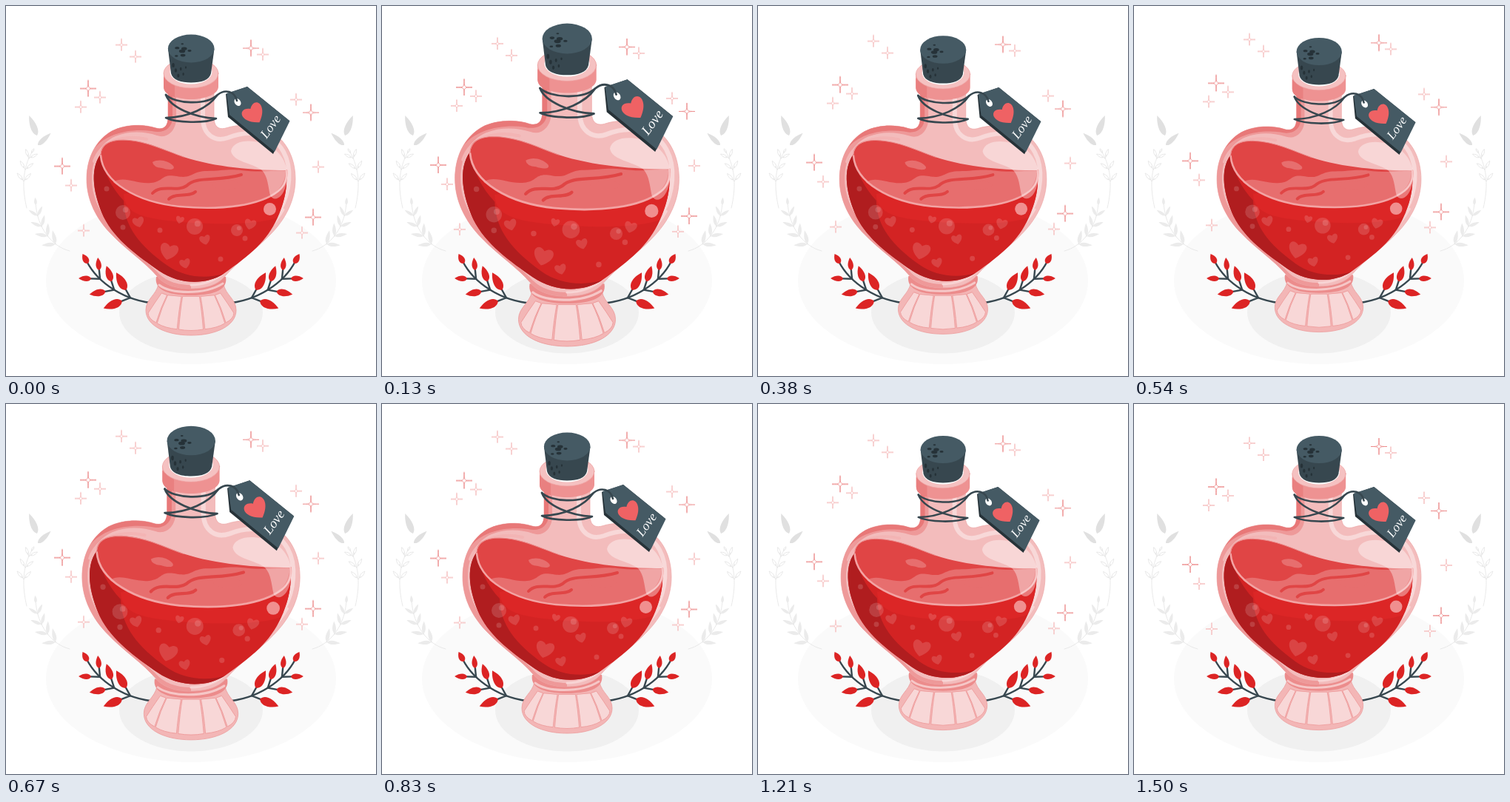
Animation of 500 by 500 pixels, one loop 1540 ms. Source, as an HTML page:

```html
<!DOCTYPE html>
<html lang="en">
<head>
<meta charset="utf-8">
<title>Love potion</title>
<style>
html, body { margin: 0; width: 100%; height: 100%; overflow: hidden; background: #fff; }
svg { display: block; width: 100%; height: 100%; }
/* both loops hold each pose for 1/24 s */
#bottle, #stars { animation: beat 1540ms step-end -6ms infinite; }
#bottle { transform-origin: 250px 241.5px; }
#stars { animation-name: drift; }
@keyframes beat {
  0% { transform: scale(1.0222); animation-timing-function: steps(3); }
  8.1% { transform: scale(1.1056); }
  8.108% { transform: scale(1.0972); animation-timing-function: steps(7); }
  27.027%, 37.83% { transform: scale(1); }
  37.838% { transform: scale(1.0111); animation-timing-function: steps(4); }
  48.64% { transform: scale(1.1222); }
  48.649% { transform: scale(1.0778); animation-timing-function: steps(3); }
  56.75% { transform: scale(.9944); }
  56.757%, 100% { transform: scale(1); }
}
@keyframes drift {
  0% { transform: translateY(-.44px); animation-timing-function: steps(18); }
  48.64% { transform: translateY(-10.44px); }
  48.649% { transform: translateY(-9.56px); animation-timing-function: steps(18); }
  97.297%, 100% { transform: translateY(0); }
}
</style>
</head>
<body>
<svg viewBox="0 0 500 500" fill="none" stroke-linecap="round" stroke-linejoin="round">
  <ellipse cx="250" cy="371" rx="196" ry="113" fill="#fafafa"/>
  <ellipse cx="250" cy="414" rx="97" ry="55.500" fill="#f0f0f0"/>

  <g id="side"></g>
  <use href="#side" transform="matrix(-1 0 0 1 500 0)"/>

  <g id="stars" fill="#fff"></g>

  <g id="bottle"><g transform="translate(250 241.500) scale(.9783) translate(-250 -241.500)">
    <!-- foot and collar -->
    <path d="M206 376C203 391 189 396 189 411C189 432 216 445 250 445C284 445 311 432 311 411C311 396 297 391 294 376Z" fill="#f3b6b6" stroke="#ec9c9c" stroke-width=".8"/>
    <g id="ribs" fill="#f8d7d7" stroke="#ee9c9c" stroke-width=".9"></g>
    <path d="M203 366C200 382 216 391 250 391C284 391 300 382 297 366Z" fill="#ec8c8c"/>
    <path d="M207 377C222 389 268 391 293 375" stroke="#f6c7c7" stroke-width="3"/>

    <!-- glass -->
    <path d="M219 112V150C219 165 211 167 203 165C185 159 160 160 143 169C120 182 109 207 109 234C109 262 122 288 143 309C163 330 188 346 204 365C215 379 235 382 250 382C265 382 285 379 296 365C312 346 337 330 357 309C378 288 391 262 391 234C391 207 380 182 357 169C340 160 315 159 297 165C289 167 281 165 281 150V112Z" fill="#f3bcbc" stroke="#eca4a4" stroke-width=".7"/>
    <path d="M219 112V150C219 165 211 167 203 165C185 159 160 160 143 169C120 182 109 207 109 234C109 262 122 288 143 309C163 330 188 346 204 365C215 379 235 382 250 382V377C225 377 212 368 203 358C180 334 116 292 116 234C116 207 127 185 148 176C168 168 188 170 204 175C218 180 230 168 230 152V112Z" fill="#ee9999"/>
    <path d="M219 112V150C219 165 211 167 203 165C185 159 160 160 143 169C133 175 126 182 120 192C135 173 166 165 197 169C212 173 225 166 225 150V112Z" fill="#e87878"/>
    <path d="M119 210C128 183 158 173 190 180" stroke="#f3b4b4" stroke-width="4"/>
    <path d="M266 122V151C266 175 283 184 300 178C330 166 361 172 375 197C387 219 384 251 370 276" stroke="#f8d8d8" stroke-width="6"/>
    <path d="M375 275C356 309 320 333 298 357C284 373 262 377 250 377" stroke="#f8d4d4" stroke-width="3"/>

    <!-- liquid -->
    <path d="M128 200C112 222 119 256 132 285C148 317 179 338 207 358C235 377 270 377 294 362C330 336 352 319 367 286C379 260 380 239 379 222Q250 256 128 200Z" fill="#d32323"/>
    <path d="M128 200C112 222 119 256 132 285C148 317 179 338 207 358C235 377 270 377 294 362C271 369 240 367 217 350C181 324 160 299 159 263C143 246 132 225 128 200Z" fill="#b01d1f"/>
    <path d="M159 254C159 282 190 287 228 291C280 296 340 296 366 286C379 260 380 240 379 224Z" fill="#dc2626"/>
    <path d="M128 207C127 188 139 181 159 181C190 182 214 195 240 204C283 218 335 222 379 222C381 238 372 249 355 259C325 273 280 275 235 271C173 264 132 237 128 207Z" fill="#e04545"/>
    <g fill="#e76e6e">
      <path d="M145 238C160 229 175 241 196 239C214 237 209 226 231 230C252 234 250 223 272 223C290 223 300 220 318 222C348 226 365 221 378 223C377 240 368 251 355 258C325 271 280 274 235 270C198 267 167 255 145 238Z"/>
      <path d="M198 211C207 206 219 209 226 216C230 222 219 222 211 219Q199 218 198 211Z"/>
    </g>
    <path d="M198 253C210 240 231 252 244 243C258 229 285 238 318 228M220 261C228 252 248 259 256 251" stroke="#e04545" stroke-width="4"/>
    <ellipse cx="298" cy="242" rx="19" ry="6" fill="#e76e6e"/>
    <path d="M128 202C131 238 176 265 235 271C292 276 343 270 368 250C379 241 380 231 379 222" stroke="#f3a3a3" stroke-width="2.600"/>
    <path d="M128 201C128 187 139 181 159 181C190 182 214 195 240 204" stroke="#eb8888"/>
    <g id="bubbles" fill="#fff" fill-opacity=".15"></g>
    <path d="M136 247h0M158 299h0M208 303h0M290 342h0M323 314h0" stroke="#fff" stroke-opacity=".15" stroke-width="7"/>

    <!-- shine -->
    <path d="M304 196C307 180 335 179 356 189C375 199 385 222 378 243C374 260 362 265 357 256C354 243 354 231 346 222C333 212 307 211 304 196Z" fill="#fff" fill-opacity=".38"/>
    <circle cx="356.500" cy="274.500" r="8.500" fill="#f08f8f"/>

    <!-- lip and cork -->
    <path d="M213 90V109C213 119 230 126 250 126C270 126 287 119 287 109V90Z" fill="#ee9292"/>
    <path d="M213 96V109C213 117 220 121 228 123V108Z" fill="#e98080"/>
    <ellipse cx="250" cy="91" rx="37" ry="20" fill="#f5c1c1" stroke="#ee9e9e" stroke-width=".7"/>
    <ellipse cx="250" cy="89" rx="28.500" ry="16.500" fill="#fff"/>
    <path d="M219 58L223 91C225 100 237 103.500 250 103.500C264 103.500 275 100 277 91L281.500 58Z" fill="#37474f"/>
    <ellipse cx="250.200" cy="57.500" rx="31.300" ry="19" fill="#455a64"/>
    <g id="pits" fill="#263238"></g>

    <!-- string and tag -->
    <path d="M297 119L326 109L383 155L361 200L300 150Z" fill="#263238"/>
    <path d="M298 118L326 109L383.500 155.500L363 197L302 147Z" fill="#455a64"/>
    <ellipse cx="313" cy="130" rx="4" ry="5.500" transform="rotate(-35 313 130)" fill="#fff"/>
    <g id="charm" fill="#ef6264"></g>
    <text transform="translate(352 180) rotate(-54)" fill="#fff" font-family="'Liberation Serif', 'Noto Serif', serif" font-style="italic" font-size="17.500">Love</text>
    <g stroke="#37474f" stroke-width="2.600">
      <path d="M216 120C228 132 270 135 286 120C296 112 309 115 312 128"/>
      <path d="M216 120C222 137 255 151 284 152C269 159 230 158 216 151C246 151 274 137 285 121"/>
    </g>
  </g></g>
</svg>
<script>
const { sin, cos, sqrt, PI } = Math;

const add = (id, name, attrs) => {
  const el = document.createElementNS('http://www.w3.org/2000/svg', name);
  for (const k in attrs) el.setAttribute(k, attrs[k]);
  document.getElementById(id).append(el);
  return el;
};

// pointed leaf growing from (x, y) along angle a
const leaf = (x, y, len, a, w, look) => add('side', 'path', {
  d: `M0 0C${len * .15} ${-w * .7} ${len * .6} ${-w * .6} ${len} 0C${len * .6} ${w * .6} ${len * .15} ${w * .7} 0 0Z`,
  transform: `translate(${x} ${y}) rotate(${a * 180 / PI})`, ...look
});

// stem with n pairs of shrinking leaves and one at its end
const sprig = ({ d, n, from, step, stalk, size, shrink, width, line, look }) => {
  const stem = add('side', 'path', { d, ...line });
  const total = stem.getTotalLength();
  const at = f => stem.getPointAtLength(f * total);
  const heading = f => {
    const p = at(f - .03), q = at(f);
    return Math.atan2(q.y - p.y, q.x - p.x);
  };
  for (let i = 0; i < n; i++) {
    const f = from + step * i, { x, y } = at(f);
    for (const s of [-1, 1]) {
      const a = heading(f) + s * .72, len = size - shrink * i;
      const bx = x + stalk * cos(a), by = y + stalk * sin(a);
      add('side', 'path', { d: `M${x} ${y}L${bx + 2 * cos(a)} ${by + 2 * sin(a)}`, ...line });
      leaf(bx, by, len, a, width * len / size, look);
    }
  }
  const end = at(.97);
  leaf(end.x, end.y, size * .55, heading(1), width * .7, look);
};

const pale = { fill: '#e0e0e0' };
const thin = { stroke: '#e4e4e4', 'stroke-width': .8 };
leaf(42, 175, 29, -1.95, 9, pale);
leaf(43, 188, 24, -.75, 7, pale);
sprig({ d: 'M28 273C22 248 21 220 36 196', n: 3, from: .46, step: .2, stalk: 3,
  size: 11, shrink: .5, width: 3.5, line: thin, look: thin });
sprig({ d: 'M86 331C62 325 42 300 40 266', n: 4, from: .25, step: .18, stalk: 1,
  size: 18, shrink: 1.5, width: 5.5, line: thin, look: { fill: '#ebebeb' } });
sprig({ d: 'M204 402C160 399 124 374 109 345', n: 3, from: .32, step: .21, stalk: 12,
  size: 27, shrink: 5, width: 12, line: { stroke: '#37474f', 'stroke-width': 2.4 }, look: { fill: '#dc2424' } });

const star = (x, y, r, stroke) => add('stars', 'path', {
  d: `M0 ${-r}C0 0 0 0 ${r} 0C0 0 0 0 0 ${r}C0 0 0 0 ${-r} 0C0 0 0 0 0 ${-r}Z`,
  transform: `translate(${x} ${y})`, stroke, 'stroke-width': .9
});
// a bright star and its paler neighbour
const pair = (x, y, dx, dy) => {
  star(x, y, 11, '#ec8a8a');
  star(x + dx, y + dy, 8, '#f5bcbc');
};
pair(111, 112, 16, 12);
pair(331, 57.5, 16, 8.5);
pair(412, 144.5, -20, -17.5);
pair(415, 286, -15, 21);
pair(76, 217, 12, 26);
[[156, 53], [175, 69], [101, 137], [105, 304], [422, 218]].forEach(p => star(...p, 8, '#f5bcbc'));

// foot: five fluted panels around the rim
for (let i = -2; i <= 2; i++) {
  const ring = (a, rx, y, ry) => `${250 + rx * sin(a)} ${y + ry * cos(a)}`;
  const a = i * .62, l = a - .29, r = a + .29;
  add('ribs', 'path', {
    d: `M${ring(l, 40, 388, 5)}Q${ring(l, 50, 402, 8)} ${ring(l, 58, 414, 24)}` +
      `Q${ring(a, 61, 414, 26)} ${ring(r, 58, 414, 24)}Q${ring(r, 50, 402, 8)} ${ring(r, 40, 388, 5)}Z`
  });
}

const heart = (id, x, y, size, turn) => add(id, 'path', {
  d: 'M0 .52C-.95 -.05 -.5 -.8 0 -.32C.5 -.8 .95 -.05 0 .52Z',
  transform: `translate(${x} ${y}) rotate(${turn}) scale(${size})`
});
heart('charm', 335, 146, 26, -34);
[[179, 292, 14], [235, 289, 10], [269, 316, 13], [220, 332, 22], [242, 348, 13], [330, 295, 14]]
  .forEach(([x, y, size], i) => heart('bubbles', x, y, size, i % 2 ? 14 : -14));

const bubble = (cx, cy, r) => add('bubbles', 'circle', { cx, cy, r });
[[158, 279, 10], [255, 298, 11], [312, 303, 8]].forEach(([x, y, r]) => {
  bubble(x, y, r);
  bubble(x + r * .35, y - r * .35, r * .37);
});

// cork pores: a spiral on top, a scatter down the side
const pit = (cx, cy, rx, ry) => add('pits', 'ellipse', { cx, cy, rx, ry });
for (let i = 0; i < 7; i++) {
  const r = 5 * sqrt(i), a = 2.9 + i * 2.4, w = 4.2 - i * .4;
  pit(238 + r * cos(a), 61 + r * .8 * sin(a), w, w * .55);
}
for (let i = 0; i < 6; i++) {
  const w = 1.8 - i * .15;
  pit(226 + 3.4 * i, 80 + i * 7 % 16, w, w * 1.7);
}
</script>
</body>
</html>
```
